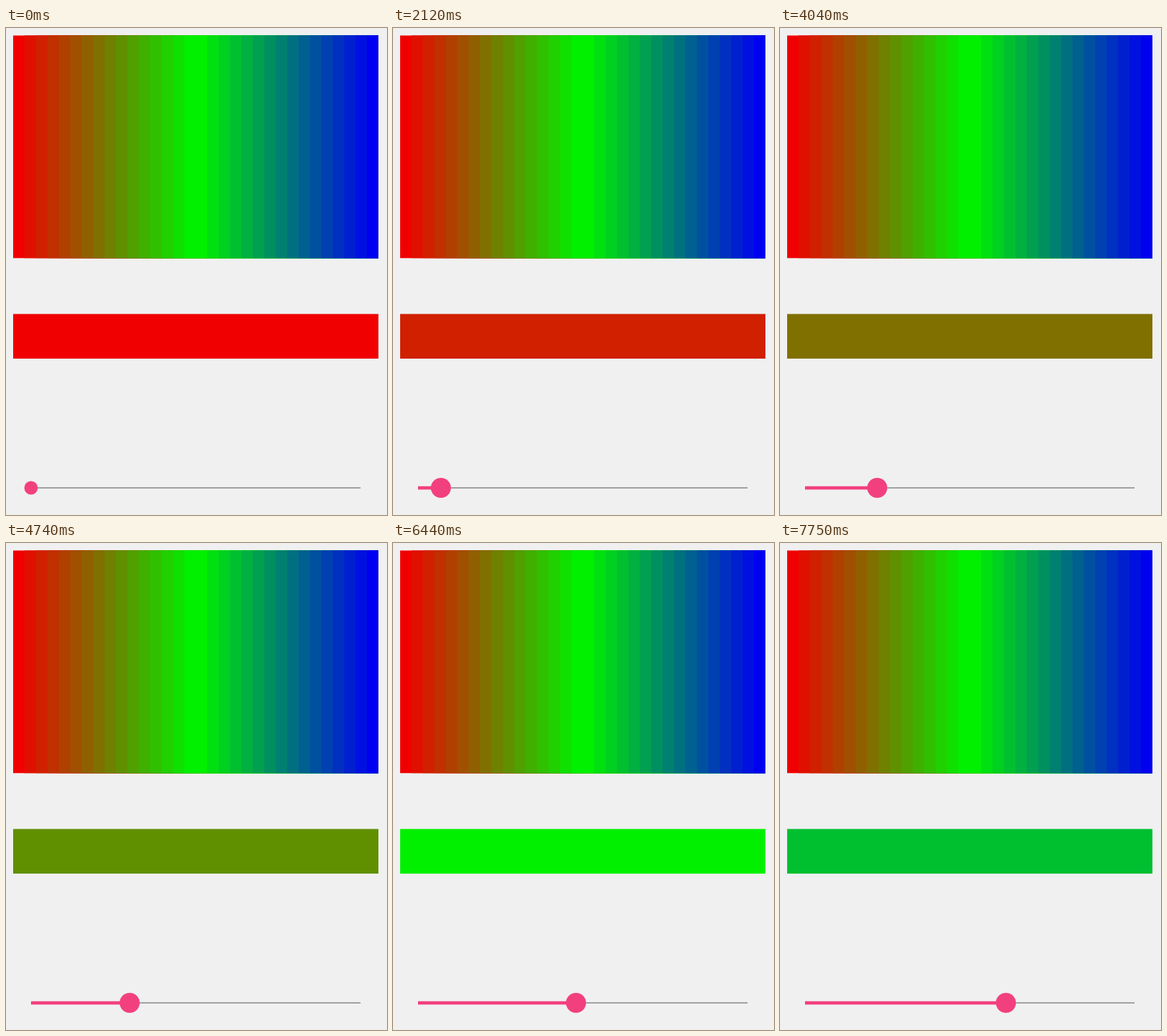
An HTML page with a canvas that plays this animation: 533x682 px, repeating every 8 s.

```html
<!DOCTYPE html>
<html lang="en">
<head>
<meta charset="utf-8">
<title>Colour slider</title>
<style>
  html, body { margin: 0; width: 100%; height: 100%; overflow: hidden; background: #f0f0f0; }
  canvas { display: block; }
</style>
</head>
<body>
<canvas id="stage" width="533" height="682"></canvas>
<script>
const ctx = document.getElementById('stage').getContext('2d');
const LOOP = 8000, PRESS = 1140, BANDS = 32, LEFT = 10, WIDTH = 511;
const TRACK = { x: 35, y: 644, width: 461 };
const PINK = '#f2407f';

// Drag path: [time in ms, slider percent]
const path = [
  [PRESS, 0], [2120, 7], [3010, 13], [3310, 17], [4240, 24],
  [4740, 30], [6040, 42], [6640, 51], [7130, 54], [7750, 61]
];

function percentAt(t) {
  if (t <= PRESS) return 0;
  const next = path.findIndex(([time]) => time > t);
  if (next < 0) return path.at(-1)[1];
  const [t0, p0] = path[next - 1], [t1, p1] = path[next];
  return Math.floor(p0 + (p1 - p0) * (t - t0) / (t1 - t0) + 0.2);
}

function bandColor(i) {
  const step = 16 * (i % 16), rest = 240 - step;
  return i < 16 ? `rgb(${rest},${step},0)` : `rgb(0,${rest},${step})`;
}

function rect(x, y, w, h, color) {
  ctx.fillStyle = color;
  ctx.fillRect(x, y, w, h);
}

function draw(t) {
  const percent = percentAt(t);
  const thumbX = Math.floor(TRACK.x + TRACK.width * percent / 100);

  rect(0, 0, 533, 682, '#f0f0f0');

  // Each band reaches the right end, so the next one blends over it
  ctx.save();
  ctx.beginPath();
  ctx.rect(LEFT, 10.4, WIDTH, 311.9);
  ctx.clip();
  for (let i = 0; i < BANDS; i++) {
    rect(LEFT + i * WIDTH / BANDS, 0, WIDTH, 340, bandColor(i));
  }
  ctx.restore();

  rect(LEFT, 400.5, WIDTH, 62.5, bandColor(Math.floor(percent * BANDS / 100)));

  rect(TRACK.x, TRACK.y - 0.7, TRACK.width, 1.4, '#808080');
  rect(TRACK.x, TRACK.y - 2.3, thumbX - TRACK.x, 4.7, PINK);
  ctx.beginPath();
  ctx.arc(thumbX, TRACK.y, t < PRESS ? 9.4 : 14, 0, 2 * Math.PI);
  ctx.fill();
}

const start = performance.now();
function tick() {
  draw((performance.now() - start) % LOOP);
  requestAnimationFrame(tick);
}
tick();
</script>
</body>
</html>
```
